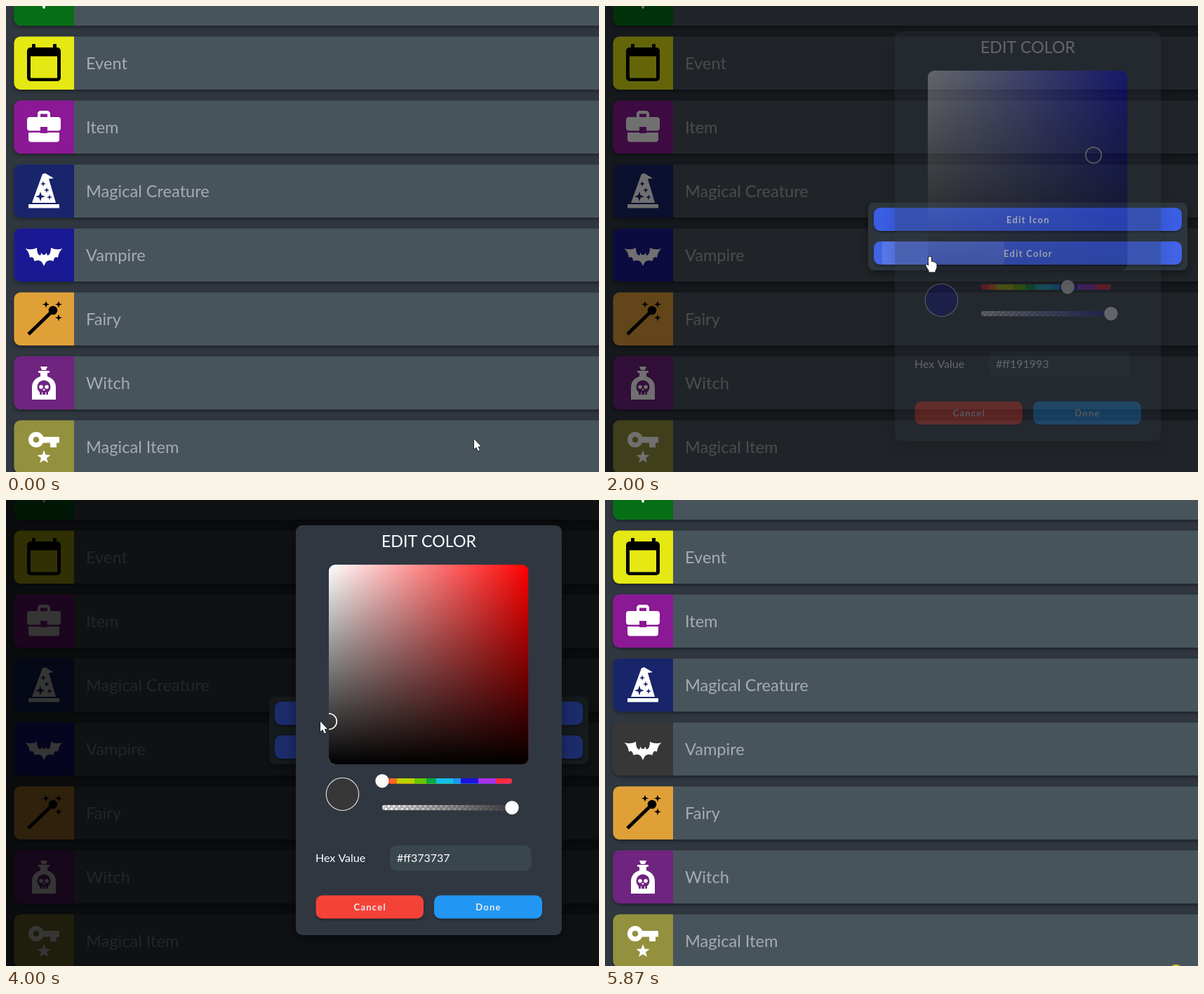
Recreate the animation shown at these times as an HTML page with a canvas. Size 845 px wide and 663 px high, loop 5940 ms.

```html
<!DOCTYPE html>
<html lang="en">
<head>
<meta charset="utf-8">
<title>Edit color</title>
<style>
html, body { margin: 0; width: 100%; height: 100%; overflow: hidden; background: #30373f; }
canvas { display: block; }
</style>
</head>
<body>
<canvas id="stage" width="845" height="663"></canvas>
<script>
const W = 845, H = 663, LOOP = 5940, TICK = 77.1;
const FONT = 'Lato, "Open Sans", sans-serif';
const screen = document.getElementById('stage').getContext('2d');
const buffer = Object.assign(document.createElement('canvas'), { width: W, height: H });
const layerCtx = buffer.getContext('2d');
let g = screen;

// ---------- helpers ----------
const clamp = (v, lo, hi) => Math.min(hi, Math.max(lo, v));
const smooth = u => u * u * (3 - 2 * u);

function fill(color) { g.fillStyle = color; g.fill(); }

function box(x, y, w, h, r, color) {
  g.beginPath();
  g.roundRect(x, y, w, h, r);
  fill(color);
}

function disc(x, y, r, color) {
  g.beginPath();
  g.arc(x, y, r, 0, 7);
  fill(color);
}

function poly(points, color) {
  g.beginPath();
  for (let i = 0; i < points.length; i += 2) g.lineTo(points[i], points[i + 1]);
  g.closePath();
  fill(color);
}

function star(x, y, n, outer, inner, color) {
  const pts = [];
  for (let i = 0; i < n * 2; i++) {
    const a = i * Math.PI / n - Math.PI / 2, r = i % 2 ? inner : outer;
    pts.push(x + r * Math.cos(a), y + r * Math.sin(a));
  }
  poly(pts, color);
}

function text(str, x, y, font, color, align = 'left', spacing = 0) {
  g.font = font + ' ' + FONT;
  g.textAlign = align;
  g.letterSpacing = spacing + 'px';
  g.fillStyle = color;
  g.fillText(str, x, y);
}

function shadowed(blur, dy, alpha, draw) {
  g.save();
  g.shadowColor = `rgba(0,0,0,${alpha})`;
  g.shadowBlur = blur;
  g.shadowOffsetY = dy;
  draw();
  g.restore();
}

function layer(alpha, draw) {
  if (alpha <= 0) return;
  layerCtx.clearRect(0, 0, W, H);
  g = layerCtx;
  draw();
  g = screen;
  g.globalAlpha = alpha;
  g.drawImage(buffer, 0, 0);
  g.globalAlpha = 1;
}

function barrier(amount) {
  g.fillStyle = `rgba(0,0,0,${0.54 * amount})`;
  g.fillRect(0, 0, W, H);
}

function button(label, x, y, w, color) {
  shadowed(3, 2, 0.35, () => box(x, y, w, 33, 9, color));
  text(label, x + w / 2 + 0.5, y + 21.5, 'bold 13px', '#e6eaf6', 'center', 1.25);
}

// ---------- icons, drawn from the tile centre ----------
function pin(c) { poly([-10, -41, 10, -41, 1.5, 13, 0, 14, -1.5, 13].map((v, i) => i % 2 ? v : v), c); }

function calendar(c, back) {
  box(-24, -22, 48, 48, 5, c);
  box(-17, -27, 5, 9, 1, c);
  box(13, -27, 5, 9, 1, c);
  g.fillStyle = back;
  g.fillRect(-19, -9.5, 38, 31);
}

function briefcase(c, back) {
  poly([-9, -20, -6, -23, 6, -23, 9, -20, 9, -13, -9, -13], c);
  g.fillStyle = back;
  g.fillRect(-5, -18.5, 10, 4.5);
  box(-24, -14, 48, 19.5, 4, c);
  box(-22, 8, 44, 13.5, [0, 0, 4, 4], c);
  g.fillStyle = back;
  g.fillRect(-5, 0, 10, 9);
}

function hat(c, back) {
  poly([-2, -24, 2, -25, 14, -18, 7, -17, 17, 17, -17, 17], c);
  box(-22, 19, 44, 5.5, 0.5, c);
  star(-5, 8, 4, 7, 2.4, back);
  star(-1, -10, 4, 4, 1.4, back);
  star(4, -1, 4, 4, 1.4, back);
  star(8, 9, 4, 4, 1.4, back);
}

function bat(c) {
  g.beginPath();
  for (const s of [1, -1]) {
    g.moveTo(0, 0);
    g.lineTo(1.6 * s, 0);
    g.lineTo(3.5 * s, -3);
    g.lineTo(5 * s, 1);
    g.quadraticCurveTo(10 * s, 0, 10 * s, -10);
    g.quadraticCurveTo(18 * s, -6, 26.5 * s, -9);
    g.quadraticCurveTo(21 * s, -4, 20 * s, 4);
    g.quadraticCurveTo(15 * s, 1, 13.5 * s, 9);
    g.quadraticCurveTo(6 * s, 6, 2.5 * s, 11);
    g.lineTo(0, 16);
    g.closePath();
  }
  fill(c);
}

function wand(c) {
  g.strokeStyle = c;
  g.lineWidth = 5;
  g.beginPath();
  g.moveTo(-22, 22);
  g.lineTo(9, -8);
  g.stroke();
  disc(13, -12, 6.3, c);
  star(3, -20.5, 4, 5, 1.8, c);
  star(21, -20.5, 4, 5, 1.8, c);
  star(21, -1.5, 4, 5, 1.8, c);
}

function potion(c, back) {
  poly([-5, -23, 5, -23, 3, -18, -3, -18], c);
  box(-8, -17, 16, 3, 1, c);
  g.beginPath();
  g.moveTo(-5, -14);
  g.lineTo(5, -14);
  g.lineTo(5, -9);
  g.quadraticCurveTo(17, -5, 17, 7);
  g.lineTo(17, 24);
  g.lineTo(-17, 24);
  g.lineTo(-17, 7);
  g.quadraticCurveTo(-17, -5, -5, -9);
  fill(c);
  disc(0, 6, 9.5, back);
  box(-6, 10, 12, 7, 1, back);
  disc(-4, 6, 2.8, c);
  disc(4, 6, 2.8, c);
  poly([0, 8, 1.8, 11, -1.8, 11], c);
  g.fillStyle = c;
  for (const x of [-3, 2]) g.fillRect(x, 13.5, 1.2, 4);
}

function key(c, back) {
  disc(-11, -10, 11, c);
  box(-4, -14, 26, 8.5, 0.5, c);
  box(9, -7, 9, 8, 0.5, c);
  disc(-11, -10, 4.3, back);
  star(0, 15, 5, 10, 4.2, c);
}

// ---------- list ----------
const ROWS = [
  ['', '#066f16', '#fff', pin],
  ['Event', '#e5e813', '#000', calendar],
  ['Item', '#8b1894', '#fff', briefcase],
  ['Magical Creature', '#18256b', '#fff', hat],
  ['Vampire', '#191993', '#fff', bat],
  ['Fairy', '#e0a038', '#000', wand],
  ['Witch', '#6f2480', '#fff', potion],
  ['Magical Item', '#93913e', '#fff', key]
];

function list(vampireColor) {
  g.fillStyle = '#30373f';
  g.fillRect(0, 0, W, H);
  ROWS.forEach(([name, tint, ink, icon], i) => {
    const y = 43.5 + 91 * (i - 1);
    const back = name === 'Vampire' ? vampireColor : tint;
    shadowed(5, 2, 0.4, () => box(11.5, y, 860, 75.5, 9, '#48545c'));
    box(11.5, y, 85.5, 75.5, [9, 0, 0, 9], back);
    g.save();
    g.translate(54, Math.round(y + 37.5));
    icon(ink, back);
    g.restore();
    text(name, 114, y + 46.5, '23.6px', '#a6acb0');
  });
}

// ---------- menu ----------
function menu(k) {
  shadowed(10, 4, 0.4, () => box(375, 279.5, 455, 96.5, 8, '#2f3840'));
  button('Edit Icon', 383, 287, 439, '#3d61eb');
  button('Edit Color', 383, 335, 439, k >= 20 && k < 30 ? '#4467ee' : '#3d61eb');
  if (k >= 23 && k < 29) {
    g.save();
    g.beginPath();
    g.roundRect(383, 335, 439, 33, 9);
    g.clip();
    disc(482, 352, 22 * (k - 22), 'rgba(255,255,255,0.13)');
    g.restore();
  }
}

// ---------- picker ----------
const AREA = { x: 460, y: 92, size: 284.5 };
const HUE_BANDS = [
  [536, '#ff2a3c'], [547, '#ff6a1e'], [557, '#bcd200'], [582, '#64c800'], [599, '#0aa845'],
  [613, '#14bfe8'], [637, '#1e96fa'], [648, '#1a14dc'], [673, '#aa30e6'], [698, '#ff2a3c']
];

function picked(k) {
  if (k < 39) return { hue: 240, s: 0.83, v: 147 / 255 };
  const [x, y] = pointer(Math.min(k, 43));
  const s = clamp((x - AREA.x) / AREA.size, 0, 1);
  return { hue: s > 0 ? 240 : 0, s, v: clamp(1 - (y - AREA.y) / 284, 0, 1) };
}

function rgb({ hue, s, v }) {
  const top = Math.round(v * 255), low = Math.round(v * (1 - s) * 255);
  return hue === 240 ? [low, low, top] : [top, low, low];
}

function shade(...stops) {
  const [x0, y0, x1, y1, from, to] = stops;
  const grad = g.createLinearGradient(x0, y0, x1, y1);
  grad.addColorStop(0, from);
  grad.addColorStop(1, to);
  return grad;
}

function area(hsv) {
  const { x, y, size } = AREA;
  g.save();
  g.beginPath();
  g.roundRect(x, y, size, size - 0.5, 9);
  g.clip();
  const pure = hsv.hue === 240 ? '#0000ff' : '#ff0000';
  g.fillStyle = shade(x, 0, x + size, 0, '#fff', pure);
  g.fillRect(x, y, size, size);
  g.fillStyle = shade(0, y, 0, y + size, 'rgba(0,0,0,0)', '#000');
  g.fillRect(x, y, size, size);
  g.strokeStyle = '#fff';
  g.lineWidth = 1.6;
  g.beginPath();
  g.arc(x + hsv.s * size, y + (1 - hsv.v) * 284, 11.3, 0, 7);
  g.stroke();
  g.restore();
}

function track(y, draw) {
  g.save();
  g.beginPath();
  g.roundRect(536, y, 185, 7.5, 3.7);
  g.clip();
  draw();
  g.restore();
}

function sliders(hsv, color) {
  track(396, () => HUE_BANDS.forEach(([x, c]) => {
    g.fillStyle = c;
    g.fillRect(x, 396, 721 - x, 8);
  }));
  track(434, () => {
    const cell = 3.75;
    for (let i = 0; i < 100; i++) {
      g.fillStyle = (i + (i >> 1)) % 2 ? '#c4c4c6' : '#fff';
      g.fillRect(536 + (i >> 1) * cell, 434 + (i % 2) * cell, cell, cell);
    }
    g.fillStyle = shade(536, 0, 721, 0, `rgba(${color},0)`, `rgb(${color})`);
    g.fillRect(536, 434, 185, 8);
  });
  disc(536 + hsv.hue / 360 * 185, 399.7, 9.7, '#fdfaf8');
  disc(721, 437.7, 9.7, '#fff');
}

function dialog(k) {
  const hsv = picked(k), color = rgb(hsv);
  shadowed(18, 8, 0.4, () => box(413, 36, 379, 583, 9, '#303741'));
  text('EDIT COLOR', 602.5, 67, '23.2px', '#fff', 'center');
  area(hsv);
  disc(479.5, 418.5, 23.2, `rgb(${color})`);
  g.strokeStyle = '#e4e6e8';
  g.lineWidth = 1.1;
  g.stroke();
  sliders(hsv, color);
  text('Hex Value', 441, 515, '16px', '#fff');
  box(547, 491.5, 201.5, 36, 9, '#3a464e');
  const hex = color.map(c => c.toString(16).padStart(2, '0')).join('');
  text('#ff' + hex, 557, 515, '16px', '#fff');
  button('Cancel', 441.5, 562.5, 153.5, '#f44336');
  button('Done', 610, 562.5, 154, k >= 58 && k < 63 ? '#2d9df5' : '#2196f3');
}

// ---------- pointer ----------
const PATH = [
  [0, 667, 616], [7, 69, 356], [12, 69, 356], [17, 283, 368], [20, 463, 357], [27, 463, 357],
  [30, 480, 365], [34, 537, 335], [37, 510, 286], [38, 509, 284], [43, 437, 315], [51, 437, 315],
  [52, 448, 315], [56, 635, 550], [57, 635, 550], [59, 655, 575], [63, 655, 575], [68, 815, 690]
];

function pointer(k) {
  const i = PATH.findIndex(p => p[0] > k);
  if (i < 0) return PATH[PATH.length - 1].slice(1);
  const [k0, x0, y0] = PATH[i - 1], [k1, x1, y1] = PATH[i];
  const u = smooth((k - k0) / (k1 - k0));
  return [x0 + (x1 - x0) * u, y0 + (y1 - y0) * u];
}

const ARROW = 'M0 0V14.5L3.2 11.6L5.6 17L8 16L5.7 10.8H10Z';
const HAND = 'M-2 1.4Q-2-.5 0-.5T2 1.4V7Q3.5 6 5 7.5Q6.5 6.8 7.5 8.5Q9 8 9.5 10V15Q9 18 7.5 19V21.5H-1.5V19.5L-5.5 13Q-6.2 10.5-4 10.8L-2 13Z';

function cursor(k) {
  const hand = (k >= 7 && k <= 12) || (k >= 19 && k <= 27) || (k >= 58 && k <= 62);
  const shape = new Path2D(hand ? HAND : ARROW);
  g.save();
  g.translate(...pointer(k));
  g.lineJoin = 'round';
  g.lineWidth = 1.6;
  g.strokeStyle = '#101214';
  g.stroke(shape);
  g.fillStyle = '#fff';
  g.fill(shape);
  g.restore();
}

// ---------- timeline ----------
const PANEL_FADE = [0, 0.3, 0.75, 0.97, 1];
const BARRIER_FADE = [0, 0.08, 0.5, 0.94, 1];

function fade(curve, k, opens) {
  return curve[clamp(Math.min(k - opens, 64 - k), 0, 4)];
}

function render(t) {
  const k = Math.floor((t + 16) / TICK);
  list(k >= 62 ? '#373737' : '#191993');
  barrier(fade(BARRIER_FADE, k, 9));
  layer(fade(PANEL_FADE, k, 9), () => menu(k));
  barrier(fade(BARRIER_FADE, k, 25));
  layer(fade(PANEL_FADE, k, 25), () => dialog(k));
  if (k >= 76) disc(813.5, 671, 10.3, '#c8c01e');
  cursor(k);
}

const start = performance.now();
function play() {
  render((performance.now() - start) % LOOP);
  requestAnimationFrame(play);
}
play();
</script>
</body>
</html>
```
